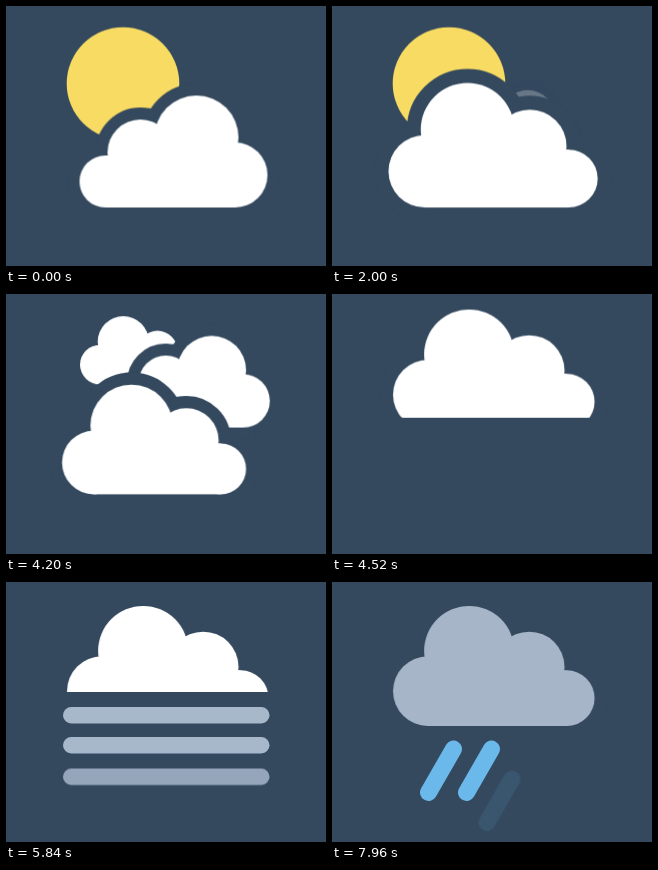
An HTML page for the animation above (8000 ms loop, 320 by 260 pixels).

```html
<!DOCTYPE html>
<html lang="en">
<head>
<meta charset="utf-8">
<title>Weather icons</title>
<style>
  html, body { margin: 0; width: 100%; height: 100%; overflow: hidden; background: #34495e; }
  svg { display: block; width: 100vw; height: 100vh; }
  .cloud { fill: #fff; }
  .gap { fill: #34495e; stroke: #34495e; }
</style>
</head>
<body>
<svg viewBox="0 0 320 260">
  <defs>
    <!-- Origin at the bottom left corner -->
    <g id="cloud">
      <circle cx="32.5" cy="-32.5" r="32.5"/>
      <circle cx="71" cy="-70" r="42"/>
      <circle cx="127" cy="-55" r="33"/>
      <circle cx="162" cy="-26" r="26"/>
      <rect x="32.5" y="-52" width="129.5" height="52"/>
    </g>
    <clipPath id="below"><rect y="156" width="320" height="104"/></clipPath>
  </defs>
  <rect width="320" height="260" fill="#34495e"/>
  <circle id="sun" r="56.3" fill="#f8db63"/>
  <g id="small" class="cloud"><use href="#cloud"/></g>
  <g id="back" class="cloud"><use href="#cloud" class="gap" stroke-width="29"/><use href="#cloud"/></g>
  <g id="first" class="cloud"><use href="#cloud" class="gap" stroke-width="24"/><use href="#cloud"/></g>
  <g id="front" class="cloud"><use href="#cloud" class="gap" stroke-width="25"/><use href="#cloud"/></g>
  <rect id="cover" y="110" width="320" height="150" fill="#34495e"/>
  <g id="bars" fill="#a7b8cb"></g>
  <g clip-path="url(#below)">
    <path id="bolt" fill="#fbdc5d" d="M149 156H171L160.500 179.500H178L135 225L148 191.500H130Z"/>
    <g id="drops" stroke="#6bb8ea" stroke-width="17" stroke-linecap="round"></g>
  </g>
</svg>
<script>
const LOOP = 8000;
const IN = 'cubic-bezier(.5,0,.85,.6)';
const OUT = 'cubic-bezier(.2,.6,.4,1)';
const SINE = 'cubic-bezier(.37,0,.63,1)';
const SOFT = 'cubic-bezier(.33,.46,.67,.86)';
const BACK = 'cubic-bezier(.34,1.4,.64,1)';

const byId = id => document.getElementById(id);
const at = (x, y, sx = 1, sy = sx) => `translate(${x}px, ${y}px) scale(${sx}, ${sy})`;

// Rows: [ms, value, easing towards the next row]
function track(el, prop, rows) {
  const full = [[0, rows[0][1]], ...rows, [LOOP, rows[rows.length - 1][1]]];
  el.animate(full.map(([ms, value, easing = 'linear']) =>
    ({ offset: ms / LOOP, [prop]: value, easing })),
    { duration: LOOP, iterations: Infinity });
}
const move = (el, rows) => track(el, 'transform', rows);
const fade = (el, rows) => track(el, 'opacity', rows);

function add(parent, tag, attrs) {
  const el = document.createElementNS('http://www.w3.org/2000/svg', tag);
  for (const name in attrs) el.setAttribute(name, attrs[name]);
  return byId(parent).appendChild(el);
}

move(byId('sun'), [
  [3000, at(117, 77.5), SINE], [3200, at(117, 77.5, 1.22), IN], [3440, at(117, 77.5, 0)]
]);

move(byId('first'), [
  [800, at(261.5, 201.5, -1, 1)], [1080, at(227.5, 201.5, -1, 1)]
]);
fade(byId('first'), [[800, 1], [1080, 0]]);

move(byId('front'), [
  [800, at(4, 201.5, .73)], [1000, at(29, 201.5, .92), OUT],
  [1240, at(60, 201.5, 1.145), SINE], [1640, at(56.5, 201.5, 1.115)],
  [1960, at(56.5, 201.5, 1.115), SINE], [2440, at(56, 202, .979)],
  [4160, at(56, 202, .979)], [4200, at(56, 200.3, .979), SINE],
  [4480, at(61, 134, 1.072), SINE], [4640, at(61, 144, 1.072)]
]);
fade(byId('front'), [[800, 0], [920, 1]]);
track(byId('front'), 'fill', [[5880, '#ffffff'], [6200, '#a6b5c8']]);

move(byId('back'), [
  [1960, at(235, 165, -.6, .6), OUT], [2440, at(265, 134, -.83, .83)],
  [4160, at(265, 134, -.83, .83), IN], [4480, at(180, 100, 0)]
]);
fade(byId('back'), [[1960, 0], [2120, 1]]);

move(byId('small'), [
  [3400, at(131, 56, 0), BACK], [3800, at(73, 91, .62)],
  [4160, at(73, 91, .62), IN], [4440, at(131, 56, 0)]
]);

move(byId('cover'), [
  [4200, at(0, 150), SINE], [4600, at(0, 0)], [5920, at(0, 0), SINE], [6200, at(0, 40)]
]);

for (let i = 0; i < 3; i++) {
  const bar = add('bars', 'rect', { x: 57, y: 125 + 30 * i, width: 206.5, height: 16.5, rx: 8.25 });
  const enter = 4600 + 200 * i;
  const leave = 5800 + 60 * (2 - i);
  move(bar, [
    [enter, at(0, -10), SOFT], [enter + 160, at(0, 0)],
    [leave, at(0, 0), SINE], [leave + 160, at(0, 10)]
  ]);
  fade(bar, [
    [enter, 0, SOFT], [enter + 160, 1], [leave, 1, SINE], [leave + 160, 0]
  ]);
}

move(byId('bolt'), [
  [6080, at(0, -72), OUT], [6300, at(0, 12), SINE], [6440, at(0, 0)],
  [6800, at(0, 0), SINE], [7040, at(0, 45)]
]);
fade(byId('bolt'), [[6080, 0], [6081, 1], [6800, 1, SINE], [7040, 0]]);

for (let i = 0; i < 3; i++) {
  const x = 121.5 + 38 * i;
  const drop = add('drops', 'line', { x1: x, y1: 167, x2: x - 25, y2: 210.5 });
  const enter = 7040 + 180 * i;
  const rows = [[enter, at(37, -64), OUT], [enter + 240, at(0, 0)]];
  move(drop, rows);
  if (i === 2) {
    move(drop, [...rows, [7760, at(0, 0), SINE], [7960, at(-19.3, 33.2)]].map(
      ([ms, value, easing]) => [ms === 7960 ? LOOP - 1 : ms, value, easing]
    ).slice(0, 3).concat([[7960, at(-17.5, 30)]]));
    fade(drop, [[7760, 1, SINE], [7960, .12]]);
  }
}
</script>
</body>
</html>
```
